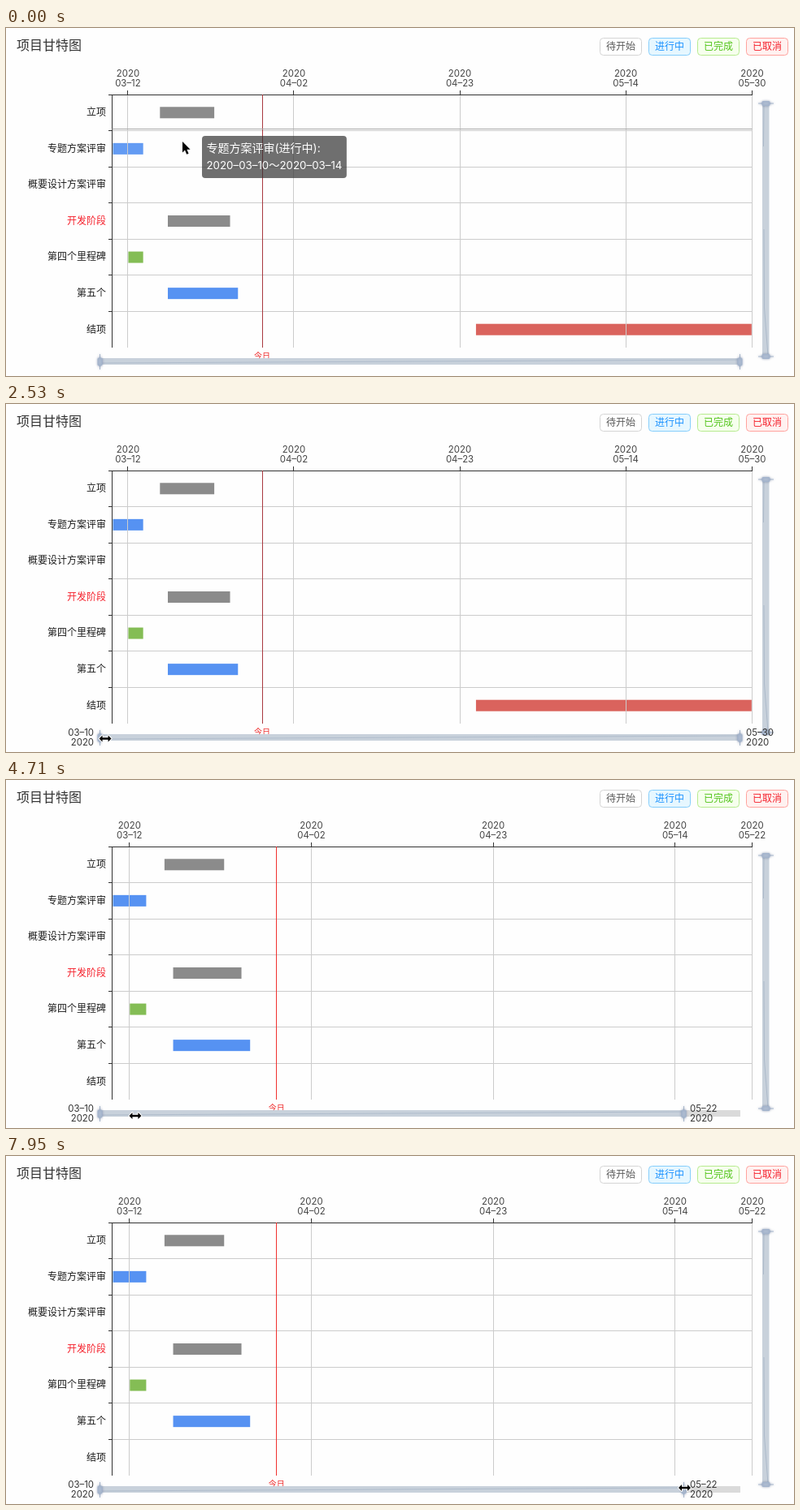
These frames come from a looping animation (969x429 px, 8 s). An HTML page with a canvas:

```html
<!DOCTYPE html>
<html lang="zh-CN">
<head>
<meta charset="utf-8">
<style>
html, body { margin: 0; width: 100%; height: 100%; overflow: hidden; background: #fefefe; }
canvas { display: block; }
</style>
</head>
<body>
<canvas id="stage" width="969" height="429"></canvas>
<script>
const ctx = document.getElementById('stage').getContext('2d');
const FONT = "Inter, 'Noto Sans CJK SC', 'Noto Sans CJK', sans-serif";
const LEFT = 130.5, RIGHT = 917.5, TOP = 82, BOTTOM = 394, ROW = (BOTTOM - TOP) / 7;
const DAYS = 81, SPAN = 73.9, TODAY = 19;
const GRAY = '#8b8b8b', BLUE = '#5692f2', GREEN = '#84bd55', RED = '#da635d';

// name, status, start day, end day (counted from March 10), colour
const tasks = [
  ['立项', '待开始', 6, 13, GRAY],
  ['专题方案评审', '进行中', 0, 4, BLUE],
  ['概要设计方案评审', '待开始', 0, 0, GRAY],
  ['开发阶段', '待开始', 7, 15, GRAY],
  ['第四个里程碑', '已完成', 2, 4, GREEN],
  ['第五个', '进行中', 7, 16, BLUE],
  ['结项', '已取消', 46, 81, RED]
];
const tags = [
  ['待开始', '#595959', '#d4d4d4', '#fff'],
  ['进行中', '#1890ff', '#85cdfb', '#e6f7ff'],
  ['已完成', '#52c41a', '#b7eb8f', '#f6ffed'],
  ['已取消', '#f5222d', '#ffa39e', '#fff1f0']
];

// keyframes: [time, value, value...]
const cursorKeys = [
  [-200, 217, 90.4], [0, 217, 140], [60, 217, 140], [820, 225, 240], [870, 226, 242],
  [1620, 122, 412.5], [2530, 122, 412.5], [3260, 161, 412], [3350, 161, 412],
  [3900, 238, 411], [4080, 238, 411], [4600, 169, 413], [4710, 159, 414],
  [4860, 150, 414], [4910, 150, 414], [5400, 219, 413], [5640, 267, 413],
  [5750, 250, 413], [6400, 199, 413], [6520, 185, 413], [6580, 185, 413],
  [6700, 260, 388], [6950, 500, 380], [7200, 760, 391], [7360, 836, 410],
  [7900, 836, 410], [7950, 834.5, 409]
];
const startKeys = [
  [2530, 0], [3260, 4], [3350, 4], [3790, 7.1], [4080, 7.1], [4600, 0],
  [4910, 0], [5400, 7.1], [5640, 7.1], [5750, 5.25], [6350, 0]
];
const tipKeys = [
  [0, 241, 133], [60, 241, 133], [820, 242, 216], [870, 242.5, 224],
  [1150, 215, 300], [1350, 190, 325], [1540, 160, 303]
];

function track(keys, t) {
  if (t <= keys[0][0]) return keys[0].slice(1);
  for (let i = 1; i < keys.length; i++) {
    const p = keys[i - 1], q = keys[i];
    if (t < q[0]) {
      const k = (t - p[0]) / (q[0] - p[0]);
      return p.slice(1).map((v, j) => v + (q[j + 1] - v) * k);
    }
  }
  return keys[keys.length - 1].slice(1);
}

function text(s, x, y, color = '#333', size = 12, align = 'center', weight = 400) {
  ctx.font = `${weight} ${size}px ${FONT}`;
  ctx.textAlign = align;
  ctx.textBaseline = 'middle';
  ctx.fillStyle = color;
  ctx.fillText(s, x, y);
}
function line(x1, y1, x2, y2, color, width = 1) {
  ctx.strokeStyle = color;
  ctx.lineWidth = width;
  ctx.beginPath();
  ctx.moveTo(x1, y1);
  ctx.lineTo(x2, y2);
  ctx.stroke();
}
function box(x, y, w, h, color) {
  ctx.fillStyle = color;
  ctx.fillRect(x, y, w, h);
}
function rounded(x, y, w, h, r, fill, stroke) {
  ctx.beginPath();
  ctx.roundRect(x, y, w, h, r);
  ctx.fillStyle = fill;
  ctx.fill();
  if (stroke) {
    ctx.strokeStyle = stroke;
    ctx.lineWidth = 1;
    ctx.stroke();
  }
}

const crisp = v => Math.floor(v) + 0.5;
const rowMid = i => TOP + ROW * (i + 0.5);
const rowAt = y => Math.max(0, Math.min(6, Math.floor((y - TOP) / ROW)));
const sliderX = d => 115.5 + d * 787 / DAYS;
const windowAt = t => {
  const [a] = track(startKeys, t);
  return [a, t < 4080 ? DAYS : Math.min(DAYS, a + SPAN)];
};
const monthDay = (d, dash = '–') => {
  const date = new Date(Date.UTC(2020, 2, 10 + Math.floor(d + 0.001)));
  return date.toISOString().slice(5, 10).replace('-', dash);
};

function header() {
  text('项目甘特图', 13, 22.5, '#333', 16, 'left', 500);
  tags.forEach(([s, color, edge, fill], i) => {
    const x = 730.5 + i * 60;
    rounded(x, 12.5, 51, 21, 4, fill, edge);
    text(s, x + 25.5, 23.5, color);
  });
}

function chart(t, a, b, hover) {
  const xOf = d => LEFT + (d - a) * (RIGHT - LEFT) / (b - a);
  tasks.forEach(([name, , from, to, color], i) => {
    text(name, 123, rowMid(i) + 0.2, i === 3 ? '#f5222d' : '#1c1c1c', 12, 'right');
    if (to === from || to < a || to > b + 0.001) return;
    const x1 = Math.max(LEFT + 1, xOf(from) + 0.5), w = xOf(to) - 0.7 - x1;
    if (w <= 0) return;
    box(x1, rowMid(i) - 7, w, 14, color);
    if (i === hover) box(x1, rowMid(i) - 7, w, 14, 'rgba(255,255,255,.08)');
  });

  const dates = [2, 23, 44, 65].filter(d => d >= a && d < b);
  if (a > 2) dates.unshift(a);
  dates.push(b);
  for (const d of dates) {
    const x = crisp(xOf(d));
    line(x, TOP, x, BOTTOM, '#ccc');
    line(x, 77, x, TOP, '#333');
    text('2020', xOf(d), 57, '#444', 11.4);
    text(monthDay(d), xOf(d), 69, '#444', 11.4);
  }
  for (let i = 0; i < 7; i++) {
    const y = crisp(TOP + i * ROW);
    if (i) line(LEFT, y, RIGHT, y, '#ccc');
    line(126, y, LEFT, y, '#333');
  }
  line(130, 82.5, 918, 82.5, '#333');
  line(LEFT, TOP, LEFT, BOTTOM, '#333');

  const today = xOf(TODAY);
  line(crisp(today), TOP, crisp(today), BOTTOM, t < 4080 ? '#a8393f' : '#f0312f');
  text('今日', today, 404.5, '#ee2a2a', 10);
}

function handle(x, y, turn) {
  ctx.save();
  ctx.translate(x, y);
  ctx.rotate(turn);
  ctx.shadowColor = 'rgba(70,90,130,.45)';
  ctx.shadowBlur = 3;
  line(0, -9.5, 0, 9.5, '#a7b7cc');
  rounded(-2.5, -4.5, 5, 9, 1, '#b4c2d6', '#a3b4cd');
  ctx.restore();
}

function sliders(a, b, labels, shownA, shownB) {
  const x1 = sliderX(a), x2 = sliderX(b), shade = 'rgba(130,150,175,.5)';
  box(115, 407, 788, 8, '#dadada');
  box(x1, 407, x2 - x1, 8, '#c8d1db');
  line(x1, 413, x2, 409, shade, 0.7);
  handle(x1, 411.5, 0);
  handle(x2, 411.5, 0);

  box(930, 93, 8.5, 312, '#c8d1db');
  line(932, 95, 931.5, 146, shade, 0.8);
  line(932, 248, 932.5, 345, shade, 0.8);
  line(932.5, 345, 937, 404, shade, 0.8);
  handle(934.5, 93, Math.PI / 2);
  handle(934.5, 405, Math.PI / 2);

  if (!labels) return;
  [[x1 - 7.5, shownA, 'right'], [x2 + 7.5, shownB, 'left']].forEach(([x, d, align]) => {
    text(monthDay(d), x, 406, '#333', 11.4, align);
    text('2020', x, 418, '#333', 11.4, align);
  });
}

function tooltip(x, y, [name, status, from, to]) {
  const title = `${name}(${status}):`;
  const range = `2020–${monthDay(from)}～2020–${monthDay(to)}`;
  ctx.font = `14px ${FONT}`;
  const wTitle = ctx.measureText(title).width;
  ctx.font = `13.3px ${FONT}`;
  const w = Math.max(wTitle, ctx.measureText(range).width) + 11;
  rounded(x, y, w, 52, 4, 'rgba(50,50,50,.7)');
  text(title, x + 5.5, y + 15.5, '#fff', 14, 'left');
  text(range, x + 5.5, y + 36.5, '#fff', 13.3, 'left');
}

const arrow = new Path2D('M0 0V13.5L3 10.6L5.2 15.7L7.6 14.7L5.4 9.7H9.6Z');
const resize = new Path2D('M-7.5 0L-3.5-4V-1.2H3.5V-4L7.5 0L3.5 4V1.2H-3.5V4Z');
const hand = new Path2D('M-1.5 1.2Q0-1 1.5 1.2V6.5Q3 4.8 4.3 6.8Q6 5.3 7 7.5Q9 6.6 9.3 9' +
  'V12.5Q9 15 7.7 17.3H0Q-2 14-4.5 11Q-5 8-1.5 10.5ZM2.5 10V14M4.7 10V14M6.9 10V14');

function pointer(x, y) {
  const overBar = y > 231 && y < 245.5 && x > 199;
  const shape = overBar ? hand : y > 403 ? resize : arrow;
  ctx.save();
  ctx.translate(x, y);
  ctx.lineJoin = 'round';
  ctx.lineWidth = overBar ? 1.2 : 2;
  ctx.strokeStyle = overBar ? '#000' : '#fff';
  ctx.fillStyle = overBar ? '#fff' : '#000';
  if (overBar) ctx.fill(shape);
  ctx.stroke(shape);
  if (!overBar) ctx.fill(shape);
  ctx.restore();
}

function draw(t) {
  const [cx, cy] = track(cursorKeys, t);
  const inside = cy < BOTTOM;
  const row = rowAt(cy);
  const [a, b] = windowAt(t);
  const [ca, cb] = windowAt(t - 103); // the chart trails the slider
  const labels = (t > 1700 && t < 6480) || t > 7420;

  ctx.clearRect(0, 0, 969, 429);
  header();
  chart(t, ca, cb, inside ? row : -1);
  sliders(a, b, labels, ca, cb);

  if (inside) {
    // the guide line glides from row to row
    let y = 0;
    for (let i = 0; i < 9; i++) y += rowMid(rowAt(track(cursorKeys, t - i * 15)[1])) / 9;
    line(LEFT, crisp(y), RIGHT, crisp(y), '#aaa');
  }
  if (t < 1700) tooltip(...track(tipKeys, t), tasks[row]);
  else if (inside) tooltip(cx > 690 ? cx - 210 : cx + 20, cy - 72, tasks[row]);
  pointer(cx, cy);
}

function loop() {
  draw(performance.now() % 8000);
  requestAnimationFrame(loop);
}
loop();
</script>
</body>
</html>
```
